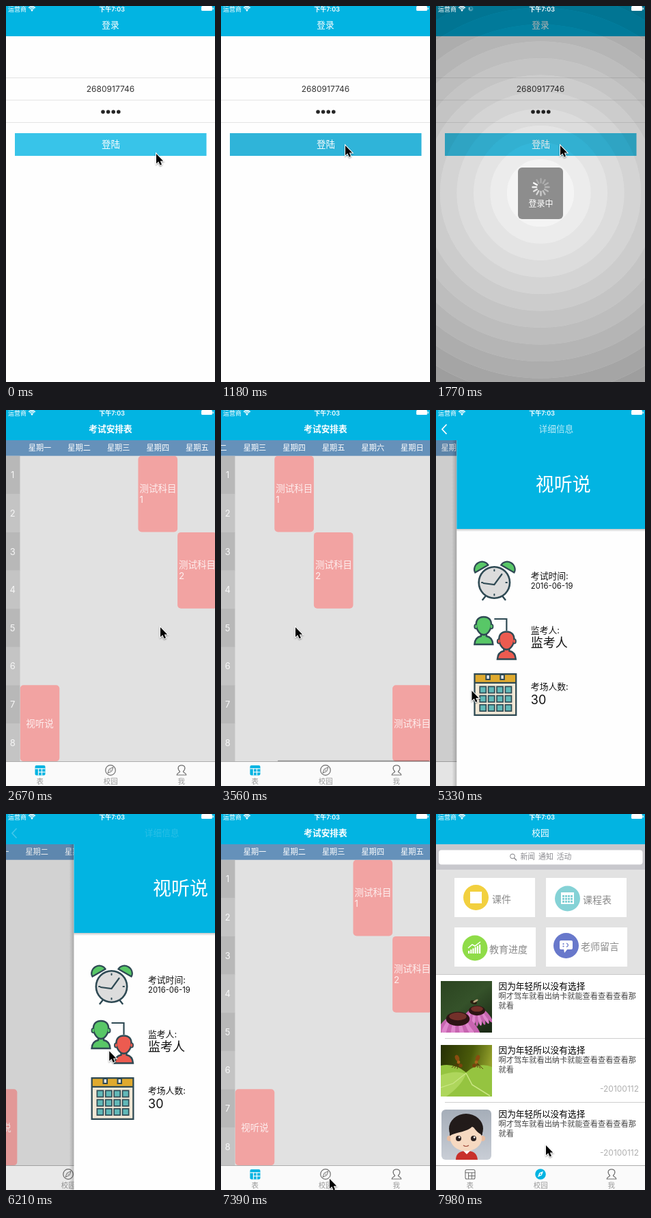
These frames come from a looping animation (306 by 547 pixels, 8000 ms). An HTML page with a canvas:

```html
<!DOCTYPE html>
<html lang="zh">
<head>
<meta charset="utf-8">
<style>
html, body { margin: 0; width: 100%; height: 100%; overflow: hidden; background: #fff; }
canvas { display: block; width: 306px; height: 547px; }
</style>
</head>
<body>
<canvas id="stage"></canvas>
<script>
const W = 306, H = 547, LOOP = 8000, TICK = 7680 / 52;
const FONT = 'Inter, "Noto Sans CJK SC", "Noto Sans CJK", "Noto Sans", sans-serif';
const BLUE = '#02b4e2', INK = '#2f4a54', COL = 57.6, ROW = 55.6, LEFT = 20.7, TOP = 66.7;
const canvas = document.getElementById('stage');
const g = canvas.getContext('2d');
const ratio = window.devicePixelRatio || 1;
canvas.width = W * ratio;
canvas.height = H * ratio;

// Keyed paths: [time, value, ...]
const POINTER = [
  [300, 220, 215], [740, 172, 113], [1180, 182, 203], [2220, 182, 203], [2660, 226, 316],
  [2810, 226, 316], [3400, 109, 316], [3700, 109, 316], [4140, 224, 316], [4580, 53, 425],
  [5170, 53, 425], [5770, 51, 360], [5900, 51, 360], [6207, 151, 345], [6500, 240, 342],
  [6940, 170, 470], [7080, 170, 470], [7390, 159, 531], [7540, 159, 531], [7980, 161, 482]
];
const SCROLL = [[2810, 0], [3330, 115.2], [3700, 115.2], [4140, 0]];
const PUSH = [[5020, 0], [5170, 0.62], [5320, 0.9], [5470, 0.98], [5610, 1], [5900, 1],
  [6207, 0.676], [6350, 0.42], [6500, 0.12], [6640, 0]];

const clamp = v => Math.max(0, Math.min(1, v));

function at(keys, t) {
  let i = keys.findIndex(k => k[0] > t);
  if (i === 0) return keys[0].slice(1);
  if (i < 0) return keys[keys.length - 1].slice(1);
  const a = keys[i - 1], b = keys[i], u = (t - a[0]) / (b[0] - a[0]);
  return a.slice(1).map((v, n) => v + (b[n + 1] - v) * u);
}

function rect(x, y, w, h, fill) {
  g.fillStyle = fill;
  g.fillRect(x, y, w, h);
}

function round(x, y, w, h, r, fill) {
  g.beginPath();
  g.roundRect(x, y, w, h, r);
  g.fillStyle = fill;
  g.fill();
}

function oval(x, y, rx, ry, fill, angle = 0) {
  g.beginPath();
  g.ellipse(x, y, rx, ry, angle, 0, 2 * Math.PI);
  g.fillStyle = fill;
  g.fill();
}

const dot = (x, y, r, fill) => oval(x, y, r, r, fill);

function ring(x, y, r, color, width) {
  g.beginPath();
  g.arc(x, y, r, 0, 2 * Math.PI);
  g.strokeStyle = color;
  g.lineWidth = width;
  g.stroke();
}

function line(points, color, width) {
  g.beginPath();
  for (let i = 0; i < points.length; i += 2) g.lineTo(points[i], points[i + 1]);
  g.strokeStyle = color;
  g.lineWidth = width;
  g.stroke();
}

function poly(points, fill) {
  g.beginPath();
  for (let i = 0; i < points.length; i += 2) g.lineTo(points[i], points[i + 1]);
  g.closePath();
  g.fillStyle = fill;
  g.fill();
}

function path(d, fill, stroke, width = 1) {
  const p = new Path2D(d);
  if (fill) { g.fillStyle = fill; g.fill(p); }
  if (stroke) { g.strokeStyle = stroke; g.lineWidth = width; g.stroke(p); }
}

// y is the vertical centre of the glyphs
function text(s, x, y, size, color, align = 'center', weight = 400) {
  g.font = `${weight} ${size}px ${FONT}`;
  g.textAlign = align;
  g.fillStyle = color;
  g.fillText(s, x, y + size * 0.37);
}

function layer(alpha, dx, draw) {
  g.save();
  g.globalAlpha *= alpha;
  g.translate(dx, 0);
  draw();
  g.restore();
}

function spinner(x, y, inner, outer, width, phase) {
  g.lineCap = 'round';
  for (let i = 0; i < 12; i++) {
    const a = (i + phase) * Math.PI / 6, c = Math.cos(a), s = Math.sin(a);
    line([x + c * inner, y + s * inner, x + c * outer, y + s * outer],
      `rgba(255,255,255,${0.25 + 0.75 * (i / 11) ** 2})`, width);
  }
  g.lineCap = 'butt';
}

function statusBar(busy, phase) {
  text('运营商', 3, 4.4, 9, '#fff', 'left');
  g.lineCap = 'butt';
  for (const r of [2.6, 5, 7.2]) {
    g.beginPath();
    g.arc(38, 7.3, r - 0.6, -Math.PI * 0.76, -Math.PI * 0.24);
    g.strokeStyle = '#fff';
    g.lineWidth = 1.4;
    g.stroke();
  }
  dot(38, 6.8, 1, '#fff');
  if (busy) spinner(51, 4, 1.7, 3.3, 0.8, phase);
  text('下午7:03', 155, 4.2, 9, '#fff', 'center', 600);
  round(286, 0, 16, 7, 1.5, '#fff');
  round(302.6, 2.3, 1.3, 3, 0.6, '#fff');
}

const navTitle = (s, weight = 400) => text(s, 153, 27.5, 12.7, '#fff', 'center', weight);

function login(t) {
  rect(0, 0, W, H, '#fefefe');
  rect(0, 0, W, 44, BLUE);
  navTitle('登录');
  for (const y of [104, 136.5, 169]) rect(0, y, W, 1, '#e4e4e4');
  text('2680917746', 153, 120.5, 12, '#333');
  for (let i = 0; i < 4; i++) dot(142 + i * 7.6, 154, 2.8, '#252525');
  rect(13, 185, 280.5, 33, t > 1170 && t < 1320 ? '#2fb4d9' : '#38c4e9');
  text('登陆', 153.5, 201.5, 13.5, '#fff');
  if (t < 1620) return statusBar(false, 0);

  const step = 24.5;
  for (let k = 1; k < 13; k++)
    ring(153, 272, (k + 0.5) * step, `rgba(0,0,0,${0.01 + 0.031 * k})`, step);
  const phase = t < 1760 ? 5 : 8;
  round(120, 235, 66, 75, 6, '#8d8d8d');
  spinner(153.5, 263.5, 6.5, 12, 2.4, phase);
  text('登录中', 153.5, 288, 12, '#fff');
  statusBar(true, phase);
}

function tableIcon(on) {
  const x = 42.5, y = 517;
  if (on) {
    round(x, y, 15, 14.5, 2, BLUE);
    rect(x, y + 4.2, 15, 1.2, '#fafafa');
    rect(x + 4.4, y + 4.2, 1.2, 10.3, '#fafafa');
    rect(x + 9.4, y + 4.2, 1.2, 10.3, '#fafafa');
    rect(x + 4.4, y + 9.2, 10.6, 1.2, '#fafafa');
  } else {
    g.beginPath();
    g.roundRect(x + 0.5, y + 0.5, 14, 13.5, 2);
    g.strokeStyle = '#707070';
    g.lineWidth = 1.1;
    g.stroke();
    line([x, y + 4.8, x + 15, y + 4.8], '#707070', 1);
    line([x + 5, y + 4.8, x + 5, y + 14], '#707070', 1);
    line([x + 10, y + 4.8, x + 10, y + 14], '#707070', 1);
    line([x + 5, y + 9.5, x + 15, y + 9.5], '#707070', 1);
  }
}

function compassIcon(on) {
  const needle = 'M157 519.7L154.8 525.6L149 528.2L151.2 522.3Z';
  if (on) {
    dot(153, 524, 7.8, BLUE);
    path(needle, '#fff');
    dot(153, 524, 1.1, BLUE);
  } else {
    ring(153, 524, 7.3, '#707070', 1.2);
    path(needle, null, '#707070', 1);
    dot(153, 524, 0.8, '#707070');
  }
}

function tabBar(active) {
  rect(0, 511.5, W, 36, '#fafafa');
  rect(0, 511, W, 1, '#adadad');
  tableIcon(active === 0);
  compassIcon(active === 1);
  path('M254.6 526C250.5 522 251.5 516.8 257 516.8S263.5 522 259.4 526C259.6 528 263.8 527.8 263.8 531H250.2C250.2 527.8 254.4 528 254.6 526Z',
    null, '#707070', 1.2);
  ['表', '校园', '我'].forEach((s, i) => text(s, 49.7 + i * 103.5, 540, 10.5, '#999'));
}

function card(c, r, lines, off, centered) {
  const x = LEFT + c * COL - off, y = TOP + r * ROW;
  round(x, y, COL, ROW * 2 - 0.4, 5, '#f2a3a2');
  const mid = y + ROW - (lines.length - 1) * 8;
  lines.forEach((s, i) => centered
    ? text(s, x + COL / 2, mid + i * 16, 13.5, '#fdeeee')
    : text(s, x + 2, mid + i * 16, 13.5, '#fdeeee', 'left'));
}

function timetable(off, indicator) {
  rect(0, 44, W, 468, '#e1e1e1');
  rect(0, 44, W, 22.7, '#6591ba');
  [...'一二三四五六日'].forEach((d, i) => text('星期' + d, LEFT + (i + 0.5) * COL - off, 55, 11.2, '#fff'));
  g.save();
  g.beginPath();
  g.rect(0, TOP, W, 445);
  g.clip();
  card(3, 0, ['测试科目', '1'], off);
  card(4, 2, ['测试科目', '2'], off);
  card(0, 6, ['视听说'], off, true);
  card(6, 6, ['测试科目'], off);
  for (let i = 0; i < 8; i++) {
    rect(0, TOP + i * ROW, 20.5, ROW + 0.3, i % 2 ? '#c4c4c4' : '#b8b8b8');
    text(i + 1, 9.7, TOP + (i + 0.5) * ROW, 13, '#f6f6f6');
  }
  g.restore();
  if (indicator) round(off * 0.72, 509.7, 222, 1.8, 0.9, 'rgba(0,0,0,.35)');
  tabBar(0);
}

function clock() {
  g.lineCap = 'round';
  line([42, 271, 38, 276], INK, 2.4);
  line([67, 271, 71, 276], INK, 2.4);
  for (const side of [-1, 1]) {
    g.save();
    g.translate(55.5 + side * 19, 231);
    g.rotate(side * 0.52);
    path('M-11 0A11 10 0 0 1 11 0Z', '#58c767', INK, 2.2);
    g.restore();
  }
  dot(55, 251, 24, INK);
  dot(55, 251, 21.4, '#dcdcdc');
  for (let i = 0; i < 4; i++) {
    const c = Math.cos(i * Math.PI / 2), s = Math.sin(i * Math.PI / 2);
    line([55 + c * 17, 251 + s * 17, 55 + c * 18.5, 251 + s * 18.5], INK, 2);
  }
  line([39, 252, 55, 254, 66, 239], INK, 2.2);
  g.lineCap = 'butt';
}

function person(x, y, fill) {
  g.save();
  g.translate(x, y);
  path('M-13.5 27C-13 19 -9 16 -4 15V10H4V15C9 16 13 19 13.5 27Z', fill, INK, 2.4);
  oval(-11.5, 1, 3, 4, INK);
  oval(11.5, 1, 3, 4, INK);
  const head = 'M0 -13C8 -13 11.5 -8 11 -1C10.5 7 5 13 0 13S-10.5 7 -11 -1C-11.5 -8 -8 -13 0 -13Z';
  path(head, fill, INK, 2.4);
  oval(-11.2, 1, 1.5, 2.4, fill);
  oval(11.2, 1, 1.5, 2.4, fill);
  g.restore();
}

function calendar() {
  rect(25, 383, 63, 62, INK);
  rect(27.3, 385.3, 58.4, 10.5, '#e0aa2e');
  rect(27.3, 398, 58.4, 44.7, '#f1e8d6');
  for (const x of [42, 63]) {
    rect(x, 384, 7.5, 9, INK);
    rect(x + 2, 386, 3.5, 5, '#e8e8e8');
  }
  for (let i = 0; i < 12; i++) {
    const x = 33 + (i % 4) * 12.4, y = 401.5 + Math.floor(i / 4) * 13.2;
    rect(x, y, 10.8, 11, INK);
    rect(x + 1.7, y + 1.7, 7.4, 7.6, '#62b9b8');
  }
}

function detail() {
  const edge = g.createLinearGradient(-7, 0, 0, 0);
  edge.addColorStop(0, 'rgba(0,0,0,0)');
  edge.addColorStop(1, 'rgba(0,0,0,.2)');
  rect(-7, 44, 7, H - 44, edge);
  rect(0, 44, W, H - 44, '#fefefe');
  const under = g.createLinearGradient(0, 173, 0, 177);
  under.addColorStop(0, 'rgba(0,0,0,.22)');
  under.addColorStop(1, 'rgba(0,0,0,0)');
  rect(0, 173, W, 4, under);
  rect(0, 44, W, 129, BLUE);
  text('视听说', 156, 108.5, 27, '#fff');
  clock();
  line([55, 304, 73, 304, 73, 321], INK, 2.2);
  person(39.5, 314, '#58c767');
  person(73, 335.5, '#ec5b50');
  calendar();
  const label = (s, y, size) => text(s, 108.5, y, size, '#111', 'left');
  label('考试时间:', 241, 12.8);
  label('2016-06-19', 256, 11.3);
  label('监考人:', 320, 12.8);
  label('监考人', 338.5, 18);
  label('考场人数:', 402.5, 12.8);
  label('30', 421, 18);
}

function schedule(t) {
  const [off] = at(SCROLL, t), [p] = at(PUSH, t);
  rect(0, 0, W, H, '#fff');
  layer(1, -p * W * 0.3, () => timetable(off, t > 2850 && t < 4450));
  if (p > 0) {
    rect(0, 44, W, H - 44, `rgba(0,0,0,${0.1 * p})`);
    layer(1, (1 - p) * W, detail);
  }
  rect(0, 0, W, 44, BLUE);
  layer(clamp(1 - p * 1.5), -p * 100, () => navTitle('考试安排表', 600));
  if (p > 0) {
    const fade = clamp((p - 0.61) / 0.39);
    layer(fade, (1 - p) * 231, () => navTitle('详细信息'));
    layer(clamp(fade * 1.5), 0, () => line([15.5, 21, 9, 28, 15.5, 35], '#fff', 1.7));
  }
  statusBar(false, 0);
}

function tile(x, y, w, cx, cy, color, label, lx, ly) {
  rect(x, y, w, 57, '#fff');
  dot(cx, cy, 18.5, color);
  text(label, lx, ly, 14, '#8a8a8a', 'left');
}

function tiles() {
  tile(27, 93, 118, 58.5, 121.5, '#f2d03f', '课件', 82, 124);
  tile(161, 93, 118, 192.5, 123, '#85d2d6', '课程表', 215, 125);
  tile(27, 165, 119, 57, 195, '#8fdc48', '教育进度', 78, 196.5);
  tile(161, 165, 119, 190.5, 191.5, '#6878cb', '老师留言', 212, 193);
  rect(50, 113, 17, 17, '#fff');
  rect(183, 114, 19, 17, '#fff');
  for (let i = 0; i < 12; i++)
    rect(185 + (i % 4) * 4, 118 + Math.floor(i / 4) * 4, 3, 3, '#85d2d6');
  for (let i = 0; i < 6; i++) {
    const h = 4 + i * 1.8;
    rect(47 + i * 3.2, 203 - h, 2.2, h, '#fff');
  }
  line([47, 195, 53, 190, 57, 192, 65, 186], '#fff', 1.5);
  round(181, 184, 19, 13, 2, '#fff');
  poly([187, 196, 193, 196, 188, 202], '#fff');
  dot(186.5, 189, 1.1, '#6878cb');
  dot(186.5, 192.5, 1.1, '#6878cb');
  path('M191 188Q196 190.7 191 193.5', null, '#6878cb', 1.2);
}

function flower(x, y, s) {
  for (let i = -4; i <= 4; i++)
    oval(x + i * 5 * s, y + (15 - Math.abs(i) * 1.2) * s, 3.4 * s, 14 * s, i % 2 ? '#df86cc' : '#c765b0', -i * 0.16);
  oval(x, y, 15 * s, 9 * s, '#2d1414');
  oval(x, y - 3 * s, 11 * s, 5 * s, '#73302a');
}

function picture(y, draw) {
  g.save();
  g.translate(7, y);
  g.beginPath();
  g.rect(0, 0, 75, 75);
  g.clip();
  draw();
  g.restore();
}

function meadow() {
  const sky = g.createLinearGradient(0, 0, 60, 75);
  sky.addColorStop(0, '#2b4420');
  sky.addColorStop(0.5, '#35522a');
  sky.addColorStop(1, '#1c2c17');
  rect(0, 0, 75, 75, sky);
  flower(53, 43, 0.8);
  flower(25, 55, 1.15);
  oval(48, 31, 5, 2.6, '#2a1d10', 0.3);
  oval(51, 29, 4, 1.4, '#b9a57c', -0.5);
}

function leaf() {
  const back = g.createLinearGradient(0, 0, 75, 20);
  back.addColorStop(0, '#262f04');
  back.addColorStop(0.6, '#4a5a0a');
  back.addColorStop(1, '#93a02c');
  rect(0, 0, 75, 75, back);
  path('M0 30Q20 26 37 40Q55 24 75 32V75H0Z', '#95c440');
  path('M0 44Q22 36 37 42Q30 60 8 75H0Z', '#aed65c');
  line([37, 41, 46, 58, 72, 74], '#cbe685', 1.5);
  line([37, 41, 18, 56, 0, 62], '#cbe685', 1.2);
  for (const side of [-1, 1]) {
    const x = 39 + side * 13;
    for (let i = -1; i < 2; i++) line([x, 25, x + side * 6 + i * 4, 34 + i], '#5a3408', 0.9);
    oval(x + side * 2, 19, 3, 4.5, '#8a4d10', side * 0.4);
    dot(x, 25, 2.4, '#a8641c');
    dot(x - side * 3, 30, 2.8, '#7a420d');
  }
}

function avatar() {
  const back = g.createLinearGradient(0, 0, 0, 75);
  back.addColorStop(0, '#a5adb8');
  back.addColorStop(1, '#c9ced6');
  round(1, 1, 73, 73, 6, back);
  path('M22 74C22 64 29 61 38 61S53 64 54 74Z', '#c8302b');
  poly([32, 60, 44, 60, 38, 66], '#fff');
  oval(37, 29, 25, 22, '#221b1a');
  dot(13, 43, 4, '#e9bda0');
  dot(61, 43, 4, '#e9bda0');
  oval(37, 43, 23, 18.5, '#f6d9c1');
  path('M13 39C13 16 60 16 61 38C54 35 50 30 47 25C38 34 25 33 13 39Z', '#221b1a');
  for (const x of [26, 48]) {
    dot(x, 43, 4, '#2a2020');
    dot(x + 1.2, 41.4, 1.3, '#fff');
  }
  path('M33 53Q37 56 41 53', null, '#a34b3c', 1.2);
}

function campus() {
  rect(0, 0, W, H, '#fff');
  rect(0, 0, W, 44, BLUE);
  navTitle('校园');
  rect(0, 44, W, 37.5, '#c8c8cd');
  round(4, 52.5, 298.5, 21, 4, '#fff');
  ring(112, 61.5, 3.4, '#808085', 1);
  line([114.5, 64, 118, 67.5], '#808085', 1.2);
  ['新闻', '通知', '活动'].forEach((s, i) => text(s, 123.5 + i * 26.6, 62.5, 10.8, '#8a8a8f', 'left'));
  rect(0, 81.5, W, 152, '#e2e2e2');
  tiles();
  rect(0, 233, W, 1, '#c9c9c9');
  [meadow, leaf, avatar].forEach((draw, i) => {
    const y = 233 + i * 93;
    if (i) rect(13, y, W - 13, 1, '#cfcfcf');
    picture(y + 10, draw);
    text('因为年轻所以没有选择', 91.5, y + 17.5, 12.7, '#000', 'left');
    text('啊才驾车就看出纳卡就能查看查看查看那', 91.5, y + 32, 11.2, '#444', 'left');
    text('就看', 91.5, y + 45.5, 11.2, '#444', 'left');
    if (i) text('-20100112', 297, y + 74, 12, '#b0b0b0', 'right');
  });
  tabBar(1);
  statusBar(false, 0);
}

function pointer(t) {
  const [x, y] = at(POINTER, t);
  g.save();
  g.translate(x, y);
  g.shadowColor = 'rgba(0,0,0,.35)';
  g.shadowBlur = 2;
  g.shadowOffsetY = 1;
  const d = 'M0 0V14.2L3.3 11.2L5.6 16.4L8 15.4L5.8 10.4H10.2Z';
  path(d, '#fff', '#fff', 2);
  g.shadowColor = 'transparent';
  path(d, '#000');
  g.restore();
}

function tick(t) {
  return t < 292 ? 0 : 300 + Math.floor((t - 292) / TICK) * TICK;
}

const start = performance.now();

function frame() {
  const t = tick((performance.now() - start) % LOOP);
  g.setTransform(ratio, 0, 0, ratio, 0, 0);
  if (t < 1910) login(t);
  else if (t < 7530) schedule(t);
  else campus();
  pointer(t);
  requestAnimationFrame(frame);
}
frame();
</script>
</body>
</html>
```
